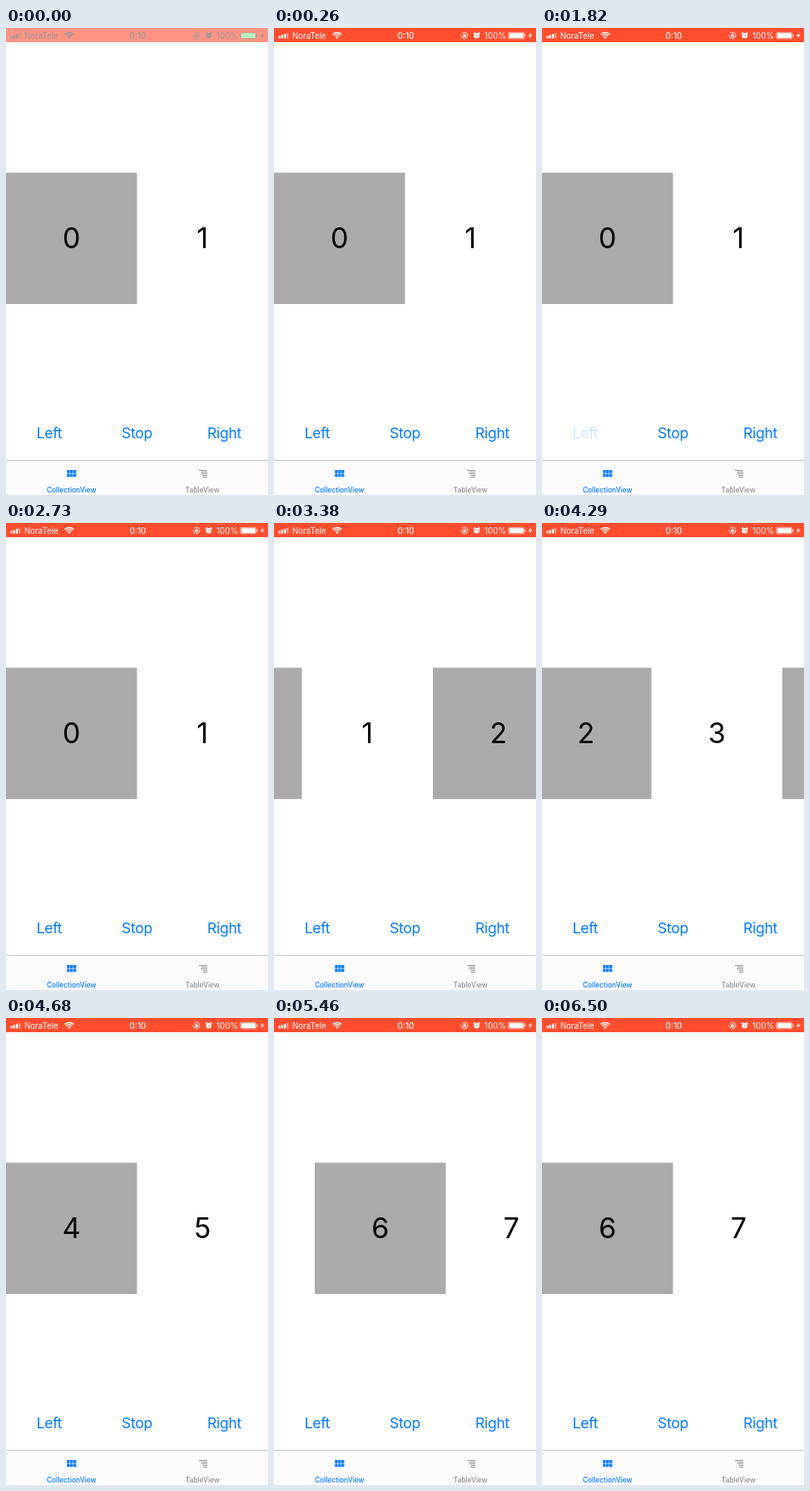
An HTML page with a canvas for the animation above (7280 ms loop, 315x560 px).

```html
<!DOCTYPE html>
<html lang="en">
<head>
<meta charset="utf-8">
<title>Auto-scrolling collection</title>
<style>
  html, body { margin: 0; width: 100%; height: 100%; overflow: hidden; background: #fff; }
  canvas { display: block; width: 315px; height: 560px; }
</style>
</head>
<body>
<canvas id="stage"></canvas>
<script>
const W = 315, H = 560, LOOP = 7280, STEP = 130;
const CELL = W / 2, CELL_TOP = 173.5;
const BLUE = '#007aff', GREY = '#929292';
const SCROLL_MS = 325, SCROLL_STARTS = [3240.5, 4232.5, 5216];

const BUTTONS = [
  { label: 'Left', x: 52, down: 1820, up: 2080 },
  { label: 'Stop', x: 157.5, down: 5980, up: 6500 },
  { label: 'Right', x: 262.5, down: 2340, up: 2730 }
];

const canvas = document.getElementById('stage');
const ctx = canvas.getContext('2d');
const dpr = window.devicePixelRatio || 1;
canvas.width = W * dpr;
canvas.height = H * dpr;
ctx.scale(dpr, dpr);

const clamp = x => Math.min(1, Math.max(0, x));
const ease = x => x * x * (3 - 2 * x);
const mix = (a, b, k) => `rgb(${a.map((v, i) => Math.round(v + (b[i] - v) * k))})`;

function rect(x, y, w, h, color) {
  ctx.fillStyle = color;
  ctx.fillRect(x, y, w, h);
}

function text(str, x, y, size, color, { weight = 400, align = 'center', spacing = 0 } = {}) {
  ctx.font = `${weight} ${size}px Inter, "Liberation Sans", sans-serif`;
  ctx.letterSpacing = spacing + 'px';
  ctx.textAlign = align;
  ctx.fillStyle = color;
  ctx.fillText(str, x, y);
}

function arc(x, y, r, from = 0, to = Math.PI * 2) {
  ctx.beginPath();
  ctx.arc(x, y, r, from, to);
  ctx.stroke();
}

function line(...points) {
  ctx.beginPath();
  points.forEach(([x, y]) => ctx.lineTo(x, y));
  ctx.stroke();
}

function drawStatusBar(t) {
  const k = clamp(0.6 + t / 650 + (t > 200 ? 0.2 : 0));
  const ink = mix([0, 0, 0], [255, 255, 255], k);
  rect(0, 0, W, 17, mix([255, 255, 255], [255, 77, 46], k));

  for (let i = 0; i < 4; i++) {
    ctx.globalAlpha = i < 3 ? 1 : 0.45;
    const h = 3 + i * 1.2;
    rect(5.5 + i * 3.2, 12.5 - h, 2.3, h, ink);
  }
  ctx.globalAlpha = 1;
  text('NoraTele', 22, 12.6, 9.7, ink, { align: 'left' });

  ctx.strokeStyle = ctx.fillStyle = ink;
  ctx.lineWidth = 1.5;
  for (const r of [7.6, 5]) arc(76, 13, r, -Math.PI * 0.75, -Math.PI * 0.25);
  ctx.beginPath();
  ctx.moveTo(76, 13);
  ctx.arc(76, 13, 2.8, -Math.PI * 0.75, -Math.PI * 0.25);
  ctx.fill();

  text('0:10', 158.5, 12.6, 10, ink, { weight: 500 });

  // Rotation lock
  ctx.lineWidth = 0.9;
  arc(229, 9, 3.9, -2.4, 3.4);
  rect(227.3, 8.5, 3.4, 2.6, ink);
  arc(229, 8.4, 1.2, Math.PI, 0);

  // Alarm clock
  ctx.beginPath();
  ctx.arc(243.7, 9.2, 3.3, 0, Math.PI * 2);
  ctx.fill();
  ctx.lineWidth = 1.2;
  line([239.9, 7], [241.8, 5.2]);
  line([245.6, 5.2], [247.5, 7]);
  ctx.strokeStyle = mix([255, 255, 255], [255, 77, 46], k);
  ctx.lineWidth = 0.8;
  line([242.1, 7.8], [243.7, 9.4], [245.4, 9.2]);

  text('100%', 279, 12.6, 9.8, ink, { align: 'right' });

  ctx.strokeStyle = ink;
  ctx.lineWidth = 0.6;
  ctx.beginPath();
  ctx.roundRect(281.8, 5.3, 19, 7.6, 1.6);
  ctx.stroke();
  rect(282.8, 6.2, 17, 5.8, mix([76, 217, 100], [255, 255, 255], k));
  rect(301.5, 7.8, 1, 2.6, ink);

  ctx.fillStyle = ink;
  ctx.beginPath();
  [[309.2, 5.3], [305.8, 9.6], [307.8, 9.6], [306.8, 12.9], [310.4, 8.3], [308.2, 8.3]]
    .forEach(([x, y]) => ctx.lineTo(x, y));
  ctx.fill();
}

function drawCells(t) {
  const pages = SCROLL_STARTS.reduce((sum, s) => sum + ease(clamp((t - s) / SCROLL_MS)), 0);
  const offset = Math.floor(pages * W);
  for (let i = 0; i < 8; i++) {
    const x = i * CELL - offset;
    if (x >= W || x + CELL <= 0) continue;
    if (i % 2 === 0) rect(x, CELL_TOP, CELL, CELL, '#acaaad');
    text(i, x + CELL / 2, 264, 34, '#000');
  }
}

function drawButtons(t) {
  for (const { label, x, down, up } of BUTTONS) {
    const held = t >= down && t < up;
    ctx.globalAlpha = held ? 0.2 + 0.8 * (t - down) / (up - down) : 1;
    text(label, x, 492, 17.5, BLUE, { spacing: -0.3 });
  }
  ctx.globalAlpha = 1;
}

function drawTabBar() {
  rect(0, 518, W, 42, '#fbfbfb');
  rect(0, 518, W, 0.8, '#b8b8b8');
  for (let i = 0; i < 6; i++) {
    rect(73.3 + (i % 3) * 3.9, 530 + Math.floor(i / 3) * 4.5, 3.3, 3.8, BLUE);
  }
  [[232, 10], [234.5, 7.5], [234.5, 7.5], [236.5, 5.5], [236.5, 5.5]]
    .forEach(([x, w], i) => rect(x, 530 + i * 2, w, 1, GREY));
  text('CollectionView', 78.7, 557, 8.4, BLUE, { weight: 500 });
  text('TableView', 236.2, 557, 8.4, GREY, { weight: 500 });
}

function draw(now) {
  const t = Math.floor((now % LOOP) / STEP) * STEP;
  rect(0, 0, W, H, '#fff');
  drawCells(t);
  drawButtons(t);
  drawTabBar();
  drawStatusBar(t);
}

let start;
function tick(now) {
  start ??= now;
  draw(now - start);
  requestAnimationFrame(tick);
}
draw(0);
requestAnimationFrame(tick);
</script>
</body>
</html>
```
